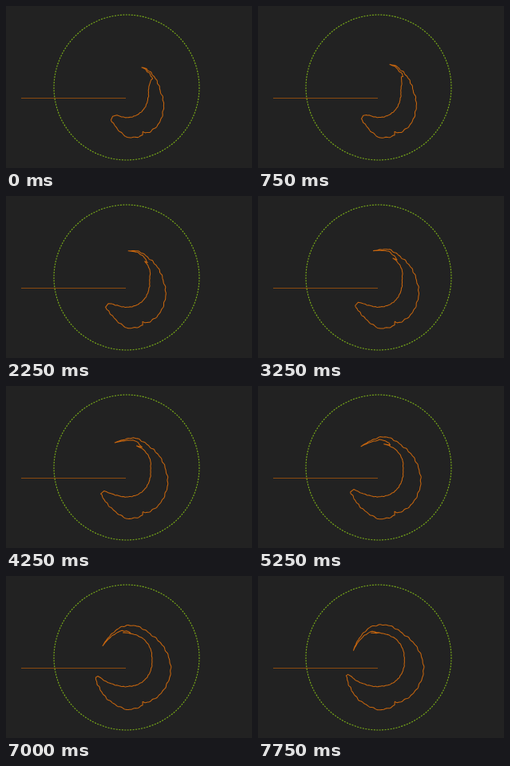
These frames come from a looping animation (308 px wide and 203 px high, 8 s). An HTML page:

```html
<!DOCTYPE html>
<html lang="en">
<head>
<meta charset="utf-8">
<title>Growing outline</title>
<style>
html, body { margin: 0; width: 100%; height: 100%; overflow: hidden; background: #222; }
svg { display: block; width: 100vw; height: 100vh; }
</style>
</head>
<body>
<svg viewBox="0 0 308 203" fill="none">
  <rect width="308" height="203" fill="#222"/>
  <circle cx="151" cy="102" r="91" stroke="#7cb018" stroke-width="1.1" stroke-dasharray="2 1.5"/>
  <path d="M19 115.5H150" stroke="#8a4a10"/>
  <path id="blob" stroke="#c8660e" stroke-width="1.05" stroke-linejoin="round"/>
</svg>
<script>
const LOOP = 8000, STEP = 250, CX = 150, CY = 112;

// Edges in polar form: [degrees clockwise from the top, radius, growth over the loop].
const OUTER = [
  [-30, 39, 8], [14, 44, 8], [40, 42, 8.5], [84, 43.5, 13], [100, 48, 10],
  [130, 54.5, 2], [147, 55, -1], [153, 52.5, 0], [155, 49.5, 0], [157, 54.5, 0],
  [177, 53, 3], [198, 41, 10], [210, 36, 13], [227, 33, 12], [250, 33, 8.5]
];
const INNER = [
  [-15, 40, 1], [35, 38, 2], [56, 35.5, 2], [76, 29, 5.2], [100, 28, 4.3],
  [130, 28.4, 1.4], [170, 28, -1.7], [200, 27, 0], [218, 29, 0], [252, 37, 0]
];

const mix = (a, b, u) => a + (b - a) * u;

function radius(edge, angle, k) {
  let i = 0;
  while (i < edge.length - 2 && angle > edge[i + 1][0]) i++;
  const [a0, r0, g0] = edge[i], [a1, r1, g1] = edge[i + 1];
  return mix(r0 + g0 * k, r1 + g1 * k, (angle - a0) / (a1 - a0));
}

function polar(angle, r) {
  const a = angle * Math.PI / 180;
  return (CX + r * Math.sin(a)).toFixed(2) + ' ' + (CY - r * Math.cos(a)).toFixed(2);
}

const ripple = angle => 0.35 * (Math.sin(angle * 0.7) + Math.sin(angle * 0.43));

function outline(k) {
  const head = 29.7 - 88 * k, tail = 211 + 41 * k;
  const hook = 58 - 46 * k - 10 * k * k, valley = 58.5 - 70 * k;
  const headR = 40.3 + 5.5 * Math.sin(Math.PI * k) - 4.5 * k;

  // The outer edge tapers down to the head.
  const outer = angle => {
    const u = Math.min(1, (angle - head) / (8 + 40 * k));
    return mix(headR, radius(OUTER, angle, k) + ripple(angle), u);
  };

  const pts = [];
  for (let a = head; a < tail; a++) pts.push(polar(a, outer(a)));
  pts.push(polar(tail, outer(tail)), polar(tail + 1, 31 + 8 * k * k));
  for (let a = tail - 5; a > valley + 6; a -= 2) {
    pts.push(polar(a, radius(INNER, a, k) + ripple(a) / 2));
  }
  pts.push(polar(valley, 37 + 4.5 * k));

  // Thin strand from the hook back to the head.
  for (let i = 16; i > 0; i--) {
    const s = i / 16, a = mix(head, hook, s);
    const gap = (3 + 7 * k) * s ** 3 + 1.5 * Math.sin(Math.PI * s);
    pts.push(polar(a, outer(a) - gap));
  }
  return 'M' + pts.join('L') + 'Z';
}

const blob = document.getElementById('blob');

function draw(ms) {
  const t = Math.floor((ms % LOOP) / STEP) * STEP;
  blob.setAttribute('d', outline(t / (LOOP - STEP)));
}

const start = performance.now();
function tick() {
  draw(performance.now() - start);
  requestAnimationFrame(tick);
}
tick();
</script>
</body>
</html>
```
